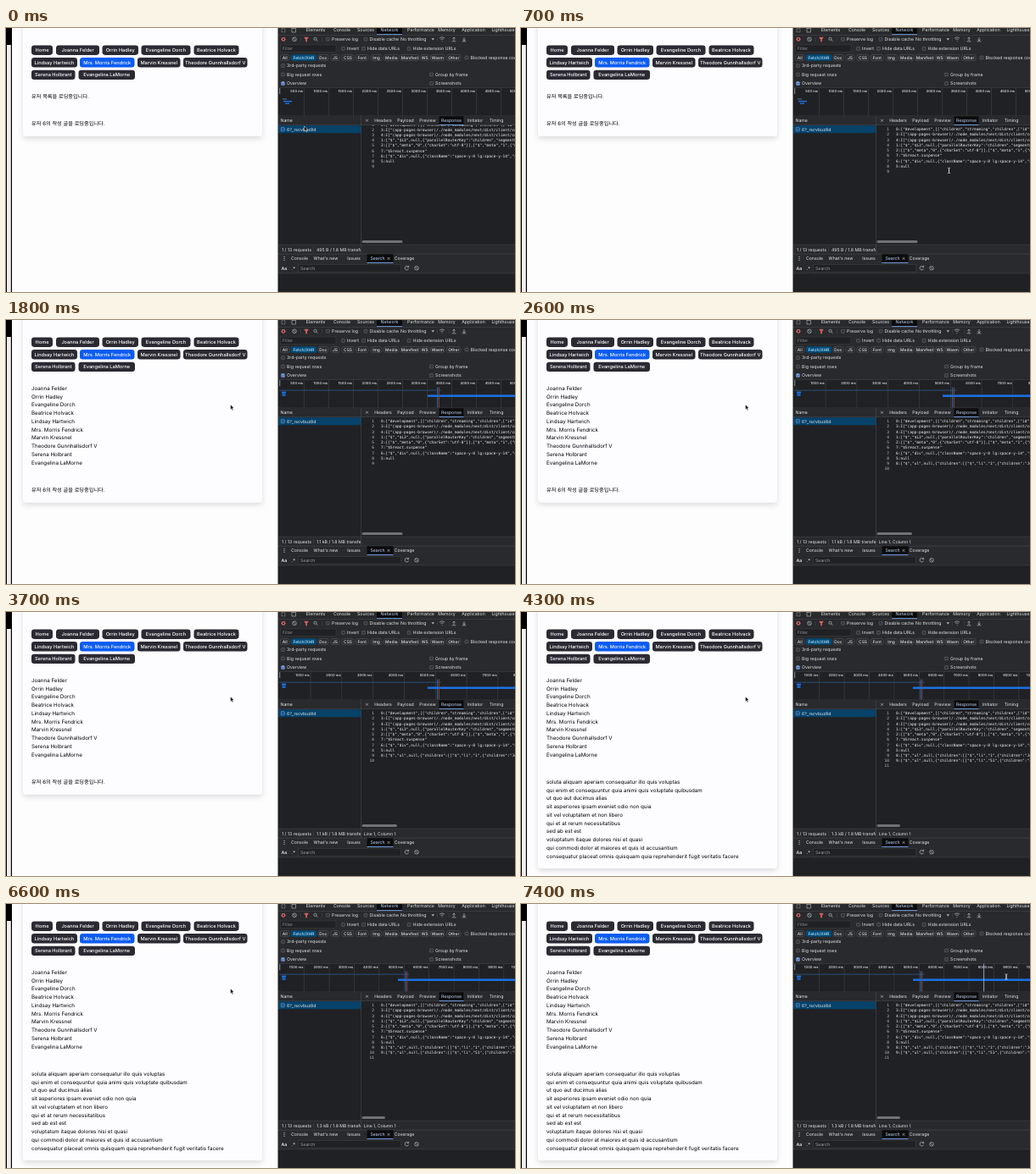
Write an HTML page that moves like this. It is 600 by 312 pixels and loops after 7.5 s.

```html
<!DOCTYPE html>
<html lang="ko">
<head>
<meta charset="utf-8">
<style>
html, body { margin: 0; width: 100%; height: 100%; overflow: hidden; background: #fdfdfe; }
svg { display: block; width: 600px; height: 312px; font-family: Inter, "Noto Sans CJK KR", "Noto Sans CJK JP", sans-serif; }
text { white-space: pre; text-rendering: geometricPrecision; }
.mono { font-family: "DejaVu Sans Mono", monospace; }
</style>
</head>
<body>
<svg id="stage" viewBox="0 0 600 312"></svg>
<script>
const LOOP = 7500, USERS = 1800, USERS_LOG = 1900, POSTS = 3800, POSTS_LOG = 3900;
const BG = '#202124', BAR = '#292a2d', LINE = '#46484c', INK = '#e4e6e9', ICON = '#b8babd';
const BLUE = '#7cacf8', LOAD = '#1a73e8', RED = '#e46962';
const stage = document.getElementById('stage');

// y is the vertical middle of the text
const text = (x, y, s, size = 5.2, fill = INK, extra = '') =>
  `<text x="${x}" y="${(y + size * 0.36).toFixed(2)}" font-size="${size}" fill="${fill}" ${extra}>${s}</text>`;
const mid = (x, y, s, size, fill, extra = '') => text(x, y, s, size, fill, 'text-anchor="middle" ' + extra);
const rect = (x, y, w, h, fill, extra = '') =>
  `<rect x="${x}" y="${y}" width="${w}" height="${h}" fill="${fill}" ${extra}/>`;
const path = (d, stroke = ICON, w = 0.7, fill = 'none') =>
  `<path d="${d}" stroke="${stroke}" stroke-width="${w}" fill="${fill}"/>`;
const ring = (x, y, r) => `<circle cx="${x}" cy="${y}" r="${r}" fill="none" stroke="${ICON}" stroke-width=".7"/>`;
const during = (from, to, s) => `<g data-from="${from}" data-to="${to}">${s}</g>`;
const noSign = (x, y) => ring(x, y, 2.3) + path(`M${x - 1.6} ${y - 1.6}l3.2 3.2`);
const cross = (x, y) => path(`M${x - 1.4} ${y - 1.4}l2.8 2.8m0 -2.8l-2.8 2.8`);
const check = (x, y, label, on) =>
  rect(x - 1.9, y - 1.9, 3.8, 3.8, on ? BLUE : '#333438', `rx=".5" stroke="${on ? BLUE : '#85878a'}" stroke-width=".4"`) +
  (on ? path(`M${x - 1.2} ${y}l1 1l1.7 -2`, '#202020') : '') + text(x + 4.6, y, label);
const tabs = (list, y, active) => list.map(([name, x]) => mid(x, y, name, 5.2, name == active ? '#c3d8fb' : INK)).join('');
const activeTab = (x, y, w, h) => rect(x, y, w, h, '#0c0c0d') + rect(x, y + h - 0.8, w, 0.9, BLUE);

const names = ['Joanna Felder', 'Orrin Hadley', 'Evangeline Dorch', 'Beatrice Holvack', 'Lindsay Hartwich',
  'Mrs. Morris Fendrick', 'Marvin Kressnel', 'Theodore Gunnhallsdorf V', 'Serena Holbrant', 'Evangelina LaMorne'];
const posts = ['soluta aliquam aperiam consequatur illo quis voluptas',
  'qui enim et consequuntur quia animi quis voluptate quibusdam', 'ut quo aut ducimus alias',
  'sit asperiores ipsam eveniet odio non quia', 'sit vel voluptatem et non libero',
  'qui et at rerum necessitatibus', 'sed ab est est', 'voluptatum itaque dolores nisi et quasi',
  'qui commodi dolor at maiores et quis id accusantium',
  'consequatur placeat omnis quisquam quia reprehenderit fugit veritatis facere'];

function page() {
  const card = (from, to, bottom) =>
    during(from, to, rect(20, -10, 282, bottom + 10, '#fdfcff', 'rx="4" filter="url(#shadow)"'));
  const chips = [[30, 55], [59, 110], [113.5, 156], [159.5, 217.5], [221.5, 274.5],
    [30, 84], [87, 151.5], [155, 205.5], [209, 284.5], [30, 81.5], [85.5, 152]];
  const list = (items, y) => items.map((s, i) => text(30, y + i * 9.77, s, 6.23, '#000')).join('');
  const wait = '유저 6의 작성 글을 로딩중입니다.';
  let s = rect(0, 0, 321, 312, '#fdfdfe') + rect(0, 0, 7, 312, '#000') + rect(1, 20, 4.8, 292, '#f0f0f0');
  s += card(0, USERS, 128) + card(USERS, POSTS, 215.5) + card(POSTS, LOOP, 303);
  chips.forEach(([a, b], i) => {
    const y = 20.5 + 14.6 * ((i > 4) + (i > 8));
    s += rect(a, y, b - a, 11.4, i == 6 ? '#0b5cf0' : '#2b2a33', 'rx="3.3"') +
      mid((a + b) / 2, y + 5.7, i ? names[i - 1] : 'Home', 5.65, '#fff', 'font-weight="500"');
  });
  return s + during(0, USERS, text(30, 80.3, '유저 목록을 로딩중입니다.', 6.2, '#000') + text(30, 113, wait, 6.2, '#000')) +
    during(USERS, LOOP, list(names, 80.5)) +
    during(USERS, POSTS, text(30, 200.5, wait, 6.2, '#000')) +
    during(POSTS, LOOP, list(posts, 200.5));
}

function toolbar() {
  let s = rect(321, 0, 279, 312, BG) + rect(320.5, 0, 0.8, 312, '#161616') + rect(321, 0, 279, 70, BAR);
  s += rect(325, 0.8, 4, 4, 'none', `stroke="${ICON}" stroke-width=".6" stroke-dasharray="1 .6"`) +
    rect(337, 0.5, 4.5, 4.5, 'none', `stroke="${ICON}" stroke-width=".6"`);
  s += activeTab(437, 0, 30, 8) + tabs([['Elements', 365], ['Console', 396], ['Sources', 424], ['Network', 452],
    ['Performance', 489], ['Memory', 519.5], ['Application', 551], ['Lighthouse', 586]], 2.5, 'Network') +
    rect(321, 8, 279, 0.5, LINE);

  s += `<circle cx="327" cy="13.3" r="2.4" fill="${RED}"/>` + rect(326, 12.3, 2, 2, BAR) + noSign(340, 13.3) +
    path('M351.7 11.2h4.6l-1.8 2.4v2.4h-1v-2.4z', RED, 0.6, RED) +
    ring(364.5, 12.8, 1.6) + path('M365.7 14l1.8 1.8') + rect(347, 11, 0.5, 5, LINE) + rect(372.5, 11, 0.5, 5, LINE);
  s += check(379.5, 13.3, 'Preserve log') + check(424, 13.3, 'Disable cache') + text(465, 13.3, 'No throttling') +
    path('M501.5 12.2h3.6l-1.8 2.4z', ICON, 0, ICON) + path('M511 12q3 -2.4 6 0m-4.5 1.5q1.5 -1.2 3 0M514 15v.8') +
    path('M528 15v-4m-1.6 1.6l1.6 -1.6l1.6 1.6m-4 3.2h4.8M540 11v4m-1.6 -1.6l1.6 1.6l1.6 -1.6m-4 2.4h4.8') +
    rect(508, 11, 0.5, 5, LINE) + rect(522, 11, 0.5, 5, LINE);

  s += rect(323.5, 20, 65.5, 8.6, BG, `stroke="${LINE}" stroke-width=".4"`) + text(326, 24.4, 'Filter', 5.2, '#8c9095') +
    check(397.5, 24.4, 'Invert') + check(421.5, 24.4, 'Hide data URLs') + check(475, 24.4, 'Hide extension URLs');

  [['All', 323.5, 334], ['Fetch/XHR', 336, 366], ['Doc', 368, 380], ['JS', 383, 393], ['CSS', 396, 410],
    ['Font', 412.5, 427], ['Img', 430, 443], ['Media', 445.5, 463], ['Manifest', 465, 487], ['WS', 488.5, 499],
    ['Wasm', 500.5, 517], ['Other', 519.5, 536]].forEach(([n, a, b], i) =>
    s += rect(a, 31.5, b - a, 7, i == 1 ? '#004a77' : BAR, `rx="2" stroke="${i == 1 ? '#004a77' : '#5a5c60'}" stroke-width=".5"`) +
      mid((a + b) / 2, 35, n, 4.9, i == 1 ? '#c2e7ff' : INK, 'font-weight="500"'));
  s += check(543, 35, 'Blocked response cookies') + check(326.5, 44.5, '3rd-party requests') +
    check(326.5, 55, 'Big request rows') + check(501.5, 55, 'Group by frame') +
    check(326.5, 65.5, 'Overview', true) + check(501.5, 65.5, 'Screenshots');
  return s;
}

function overview() {
  const ruler = (step, unit) => {
    let r = '';
    for (let i = 1; 322 + i * step < 630; i++) {
      const x = 322 + i * step;
      r += rect(x, 70.5, 0.5, 33, LINE) + text(x - 1, 74.9, i * unit + ' ms', 4.1, INK, 'text-anchor="end" font-weight="500"');
    }
    return r;
  };
  const bars = (x, mark) =>
    rect(325, 84.6, 5, 2.2, LOAD) + rect(325.5, 87.5, 4, 2.2, LOAD) + rect(322, 82.7, mark - 319, 0.8, '#2a5a8c') +
    rect(x, 88.4, 600 - x, 2.5, LOAD) + rect(mark - 1.8, 79.5, 1, 24, '#2f6fb5') + rect(mark, 79.5, 0.9, 24, '#8a3f3a');
  return rect(321, 70.2, 279, 0.5, LINE) +
    during(0, USERS_LOG, ruler(29, 500)) + during(USERS_LOG, POSTS_LOG, ruler(36.8, 1000)) +
    during(POSTS_LOG, LOOP, ruler(29.4, 1000)) +
    during(0, USERS, rect(326, 83.5, 5, 1, '#4a7fb5') + rect(327, 86, 10, 1.4, LOAD) + rect(329, 88.6, 5, 1.3, LOAD)) +
    during(USERS, POSTS_LOG, bars(497, 510)) + during(POSTS_LOG, LOOP, bars(462, 472.5)) +
    during(7400, LOOP, rect(545.3, 70.5, 0.8, 33, '#a9c7f5')) +
    rect(322, 71, 1.3, 7, '#6b7684') + rect(321, 103.7, 279, 0.6, LINE);
}

function response() {
  const rows = ['0:["development",[["children","streaming","children",["id","6',
    '3:I["(app-pages-browser)/./node_modules/next/dist/client/compo',
    '4:I["(app-pages-browser)/./node_modules/next/dist/client/compo',
    '1:["$","$L3",null,{"parallelRouterKey":"children","segmentPath"',
    '2:[["$","meta","0",{"charSet":"utf-8"}],["$","meta","1",{"name"',
    '7:"$Sreact.suspense"', '6:["$","div",null,{"className":"space-y-8 lg:space-y-14","child', '5:null',
    '8:["$","ul",null,{"children":[["$","li","1",{"children":"Joanna',
    '9:["$","ul",null,{"children":[["$","li","51",{"children":"solut'];
  const since = i => i < 8 ? 0 : i == 8 ? USERS_LOG : POSTS_LOG;
  const y = i => 119.6 + i * 6.22;
  let code = '';
  for (let i = 0; i < 11; i++) {
    code += during(since(i - 1), LOOP, text(434, y(i), i + 1, 4.5, '#c4c7ca', 'text-anchor="end"'));
    if (rows[i]) code += during(since(i), LOOP, text(442, y(i), rows[i], 4.5, '#f4f5f6'));
  }
  const thumb = (from, to, w) => during(from, to, rect(419.5, 251, w, 3, '#707276', 'rx="1.5"'));
  return rect(321, 104, 279, 11, BAR) + rect(321, 114.5, 279, 0.5, LINE) + text(323.5, 109.3, 'Name') +
    rect(321, 115.2, 97.5, 9, '#06426a') + rect(324.3, 117.6, 4, 4.2, 'none', `stroke="${BLUE}" stroke-width=".6" rx=".6"`) +
    path('M325.2 119.7h2.2', BLUE, 0.6) + text(331, 119.7, '6?_rscvbuz8d') + cross(425.5, 109.3) +
    activeTab(510.5, 104.3, 29, 10.5) + tabs([['Headers', 444.5], ['Payload', 471], ['Preview', 497], ['Response', 525],
      ['Initiator', 553], ['Timing', 578]], 109.3, 'Response') +
    `<g clip-path="url(#view)"><g id="code" class="mono">${code}</g></g>` +
    thumb(0, USERS_LOG, 48) + thumb(USERS_LOG, POSTS_LOG, 41.5) + thumb(POSTS_LOG, LOOP, 27.5);
}

function footer() {
  const size = (from, to, n) => during(from, to, text(366, 261.7, n + ' / 1.8 MB transferred'));
  let s = rect(321, 256, 279, 22, BAR) + rect(321, 255.8, 279, 0.5, LINE) +
    text(325, 261.7, '1 / 13 requests') + rect(362.5, 258.5, 0.5, 6.5, LINE) +
    `<g clip-path="url(#sum)">${size(0, USERS, '495 B') + size(USERS, POSTS_LOG, '1.1 kB') + size(POSTS_LOG, LOOP, '1.3 kB')}</g>` +
    during(USERS_LOG, LOOP, text(421.8, 261.7, 'Line 1, Column 1', 5)) +
    rect(418.3, 104, 0.6, 163, LINE) + rect(321, 266.8, 279, 0.6, LINE);
  for (const y of [270.4, 272.4, 274.4]) s += `<circle cx="328" cy="${y}" r=".6" fill="${ICON}"/>`;
  return s + activeTab(425.5, 267.3, 31, 10.5) + tabs([['Console', 346], ["What's new", 377], ['Issues', 410],
    ['Search', 438], ['Coverage', 469.5]], 272.4, 'Search') + cross(451, 272.4) +
    rect(321, 278, 279, 12, BAR) +
    text(324.5, 283.8, 'Aa', 5.2, INK, 'font-weight="600"') + text(336.5, 283.8, '.*', 5.2, INK, 'font-weight="600"') +
    rect(344.5, 279.7, 121, 8.4, BG, `stroke="${LINE}" stroke-width=".4"`) + text(347, 283.8, 'Search', 5.2, '#9aa0a6') +
    path('M474.3 282.3a2.3 2.3 0 1 0 .3 2.2M474.6 280.8v1.9h-1.9') + noSign(484, 283.8) + rect(321, 289.7, 279, 0.5, LINE);
}

stage.innerHTML = `<defs>
  <filter id="shadow" x="-10%" y="-10%" width="120%" height="130%">
    <feDropShadow dx="0" dy="3" stdDeviation="3" flood-color="#000" flood-opacity=".13"/></filter>
  <clipPath id="view"><rect x="419" y="115" width="181" height="136"/></clipPath>
  <clipPath id="sum"><rect x="362" y="256" width="56" height="11"/></clipPath></defs>` +
  page() + toolbar() + overview() + response() + footer() +
  `<g id="arrow">${path('M0 0v6l1.4 -1.3l1 2.2l1 -.4l-1 -2.2h1.9z', '#fff', 0.5, '#000')}</g>
   <g id="beam">${path('M-1.5 -3.2q1.5 0 1.5 1v4.4q0 1 -1.5 1M1.5 -3.2q-1.5 0 -1.5 1v4.4q0 1 1.5 1', '#e8e8e8', 0.7)}</g>`;

const phases = [...stage.querySelectorAll('[data-from]')];
const [code, arrow, beam] = ['code', 'arrow', 'beam'].map(id => document.getElementById(id));
// time, x, y of the pointer
const track = [[0, 351.5, 116], [600, 504.5, 168.5], [800, 504.5, 168.5], [1300, 264.5, 100],
  [7100, 264.5, 100], [7200, 400, 138], [7300, 536, 132], [7400, 572, 86], [LOOP, 572, 86]];

function pointer(t) {
  const i = track.findIndex(k => k[0] > t);
  const [a, ax, ay] = track[i - 1], [b, bx, by] = track[i];
  const u = (t - a) / (b - a), e = u * u * (3 - 2 * u);
  return [ax + (bx - ax) * e, ay + (by - ay) * e];
}

function draw(now) {
  const t = Math.floor(now % LOOP / 100) * 100;
  for (const g of phases) g.style.display = t >= g.dataset.from && t < g.dataset.to ? '' : 'none';
  code.setAttribute('transform', `translate(0 ${t < 100 ? -5.6 : 0})`);
  const [x, y] = pointer(t), overText = x > 419;
  arrow.style.display = overText ? 'none' : '';
  beam.style.display = overText ? '' : 'none';
  (overText ? beam : arrow).setAttribute('transform', `translate(${x} ${y})`);
}

const start = performance.now();
function tick() {
  draw(performance.now() - start);
  requestAnimationFrame(tick);
}
tick();
</script>
</body>
</html>
```
